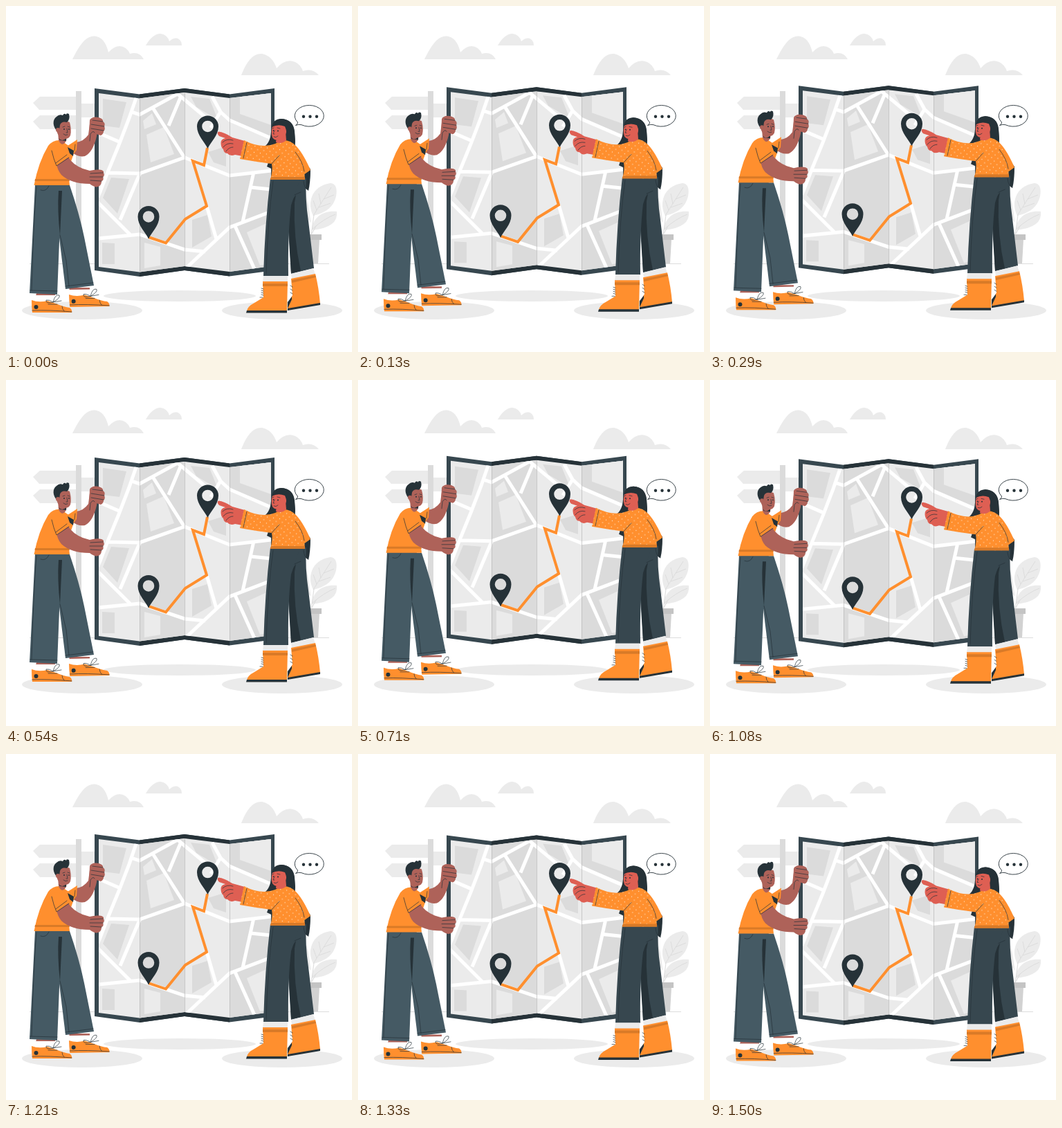
An HTML page for the animation above (1540 ms loop, 500x500 px).

```html
<!DOCTYPE html>
<html lang="en">
<head>
<meta charset="utf-8">
<title>Reading the map</title>
<style>
  html, body { margin: 0; width: 100%; height: 100%; overflow: hidden; background: #fff; }
  svg { display: block; width: 100%; height: 100%; }
  .pale { fill: #ebebeb; }
  .grey { fill: #dbdbdb; }
  .ink { fill: #263238; }
  .slate { fill: #37474f; }
  .denim { fill: #455a64; }
  .orange { fill: #ff8f2e; }
  .rust { fill: #d97a27; }
  .brown { fill: #ae6259; }
  .red { fill: #de5f53; }
  .white { fill: #fff; }
  .line { fill: none; stroke: #263238; stroke-width: .7; stroke-linecap: round; stroke-linejoin: round; }
  .road { fill: none; stroke: #fff; stroke-width: 5; }
  .route { fill: none; stroke: #ff8f2e; stroke-width: 4; }
  .vein { fill: none; stroke: #d6d6d6; stroke-width: .7; }
</style>
</head>
<body>
<svg viewBox="0 0 500 500">
  <defs>
    <clipPath id="sheet"><path d="M134 126L193 133.500 258 125 323 133 383 126V376L323 384 258 376 193 384.500 134 377Z"/></clipPath>
    <pattern id="dots" width="9" height="9" patternUnits="userSpaceOnUse" patternTransform="rotate(8)">
      <g fill="#ffe3c8"><circle cx="2" cy="2" r=".65"/><circle cx="6.500" cy="6.500" r=".65"/></g>
    </pattern>
    <path id="jumper" d="M344 194Q369 207 389 199L398 194Q412 193 419 203Q430 220 432 251H382Q386 237 384 228Q360 225 338 221Z"/>
    <path id="pin" class="ink" fill-rule="evenodd" d="M0 0C-4-9-15.500-19-15.500-32A15.500 15.500 0 0 1 15.500-32C15.500-19 4-9 0 0ZM-8.300-32A8.300 8.300 0 0 0 8.300-32A8.300 8.300 0 0 0-8.300-32Z"/>
    <g id="sneaker">
      <path class="white" d="M1-7H35L34 5H2Z"/>
      <path class="orange" d="M0 0Q10 4 23 1L35 5Q47 10 55 11Q59 14 58 18H1Q0 10 0 0Z"/>
      <path class="line" d="M1 15Q25 14 58 17M44 9Q44 13 47 16M24 6L37 6M31 3Q20 6 21 0Q25-1 31 3Q34-9 40-7Q42-3 31 3L43 1"/>
      <circle class="ink" cx="6.500" cy="10" r="3"/>
    </g>
  </defs>

  <g class="pale">
    <path d="M96 77C106 57 115 43 128 43.500Q143 45 148 67Q161 53 173 61Q177 64 179 69Q193 65 199 77Z"/>
    <path d="M202 57Q212 40 223 40Q233 41 236 51Q244 44 250 48Q254 51 254 57Z"/>
    <path d="M340 100C348 80 357 68 370 69Q385 72 391 90Q404 75 418 81Q426 85 429 94Q443 89 452 100Z"/>
    <path d="M39 140L49 131H109V150H48ZM39 167L49 158H109V178H49ZM109 141H135V161H109Z"/>
    <ellipse cx="110" cy="440" rx="87" ry="13"/>
    <ellipse cx="251" cy="419" rx="110" ry="8"/>
    <ellipse cx="399" cy="440" rx="87" ry="13"/>
  </g>
  <path class="grey" d="M101 123H109V372H101Z"/>
  <path d="M34 372.500H467" stroke="#d5d5d5" stroke-width=".8"/>
  <g class="pale">
    <path d="M444 303C435 287 440 260 469 256Q480 257 477 275Q472 297 444 303Z"/>
    <path d="M442 324C443 304 460 295 478 297Q481 320 442 324Z"/>
    <path d="M441 313C437 292 438 274 425 261Q415 288 441 313Z"/>
  </g>
  <path class="vein" d="M444 303Q457 282 470 262M449 295L444 281M455 286L452 271M452 291L469 285M459 279L474 273M443 322Q460 307 476 301"/>
  <path d="M441 332L445 302M442 329L448 318" fill="none" stroke="#dbdbdb"/>
  <path fill="#d2d2d2" d="M435 337H453L451 372H437Z"/>
  <path fill="#c4c4c4" d="M432 330H456V338H432Z"/>

  <path class="white" stroke="#263238" stroke-width=".9" d="M418.500 172.500Q422 170.500 421.500 168A21 15.300 0 1 1 427 171.700Q423 170.500 418.500 172.500Z"/>
  <g class="ink"><circle cx="430" cy="159.700" r="2.200"/><circle cx="439.500" cy="159.700" r="2.200"/><circle cx="449" cy="159.700" r="2.200"/></g>

  <g id="float">
    <path class="slate" d="M128 119L193 127.500 258 119 323 127.500 388 119V382L323 390.500 258 382 193 391 128 382Z"/>
    <path class="ink" d="M193 127.500L258 119 323 127.500V390.500L258 382 193 391Z"/>
    <g clip-path="url(#sheet)">
      <path class="pale" d="M128 119H388V392H128Z"/>
      <g class="grey">
        <path d="M193 119H258V392H193ZM323 119H388V392H323Z"/>
        <path d="M140 134L174 139 164 176 140 173ZM152 248L178 250 161 300 140 277ZM139 342L157 343V373H139Z"/>
        <path d="M267 131L294 134 306 164 275 146ZM292 211L318 203V232L300 226ZM269 309L291 302 297 333 269 349Z"/>
      </g>
      <g class="pale">
        <path d="M203 186L228 175 243 214 209 226ZM198 166L211 155 217 171 200 178ZM200 342L223 348V375L200 379Z"/>
        <path d="M338 130L383 124V172L338 156ZM323 165L383 191V238L323 245ZM348 327L383 311V372L367 375Z"/>
      </g>
      <path class="road" d="M189 130L178 162 163 201 147 240 133 276M133 183L163 196M181 153L193 157 248 127 291 163M147 241L193 242 258 219 323 245 383 238M133 284L180 331M193 243L165 309M133 336L193 330 258 352 288 355M212 147L259 221M253 130L235 173M298 131L310 153 323 165 383 191M310 153L296 176M358 240L342 312M354 262L383 265M260 379L323 320 383 297M290 289L304 337M331 318L359 380"/>
      <path d="M193.500 128V390M258.500 120V382M323.500 128V390" fill="none" stroke="#b8b8b8" stroke-width=".7"/>
    </g>
    <path class="route" d="M291 205L286 230 270 224 290 289 259 308 231 342.500 206 334"/>
    <use href="#pin" x="206" y="336.500"/>
    <use href="#pin" x="291.500" y="206"/>

    <!-- man -->
    <path class="brown" d="M44 415H71V419H43ZM91 407H121V411H92Z"/>
    <use href="#sneaker" transform="translate(91 417) rotate(-1)"/>
    <use href="#sneaker" transform="translate(37 425)"/>
    <path class="denim" d="M75 259H92Q106 300 113 334L127 404 86 409 77 335Z"/>
    <path class="denim" d="M42 258H85Q77 295 77 340L74 417 34 415 38 338Z"/>
    <path class="ink" d="M76 267H81L78 331Q74 295 76 267Z"/>
    <path class="line" d="M50 266Q58 269 62 260M44 261Q41 300 39 350L37 411M35 411L74 412M78 331L87 368 91 405M86 405L126 400"/>
    <path class="brown" d="M101 197Q112 196 119 186L122 163 133 162 131 188Q126 211 114 217Q104 219 95 211Z"/>
    <path class="orange" d="M89 202Q97 197 103 193L102 208 97 215Z"/>
    <path class="orange" d="M40.500 259Q47 225 61 202Q68 193 79 194L92 203 97 216Q88 237 92 259Z"/>
    <path class="ink" d="M89 204L98 209 97 217 92 213Z"/>
    <path class="rust" d="M42 250H91L92 253H41.500Z"/>
    <path class="brown" d="M75 182L88 188 87 195Q81 205 76 194Z"/>
    <path class="ink" d="M76 191Q81 197 87 191L87 195 78 194Z"/>
    <path class="brown" d="M72 170Q82 162 92 168Q95 179 93 187Q90 194 81 191Q72 187 72 170Z"/>
    <path class="ink" d="M74 181C67 174 67 164 73 160Q77 156 82 158Q84 154 87 157Q87 154 91 156Q93 164 88 168Q80 166 78 172L77 179Z"/>
    <circle class="brown" cx="75" cy="179" r="3"/>
    <path class="line" d="M82 175L85 174M89 174L92 175M88 177L89 183 87 183M83 185Q86 188 89 186"/>
    <g class="ink"><circle cx="84" cy="178" r="1"/><circle cx="91" cy="178" r=".9"/></g>
    <path class="brown" d="M73 227L89 217Q96 229 111 235L121 238Q128 236 135 236.500Q142 237 141 241Q143 245 140 247Q142 252 138 253Q138 258 135 260Q130 264 121 257Q94 257 80 244Q74 237 73 227Z"/>
    <path class="orange" d="M65 206Q76 200 82 207L91 218 73 231Z"/>
    <path class="line" d="M66 209Q69 222 73 231L91 219M72 227L88 215M122 242L140 241M121 247L140 247M122 252L138 253M100 200L99 209"/>
    <path class="brown" d="M121 165Q124 159 134 161Q141 163 140 167Q144 169 142 174Q144 178 141 181Q141 185 137 187L127 184Q127 194 122 199Q118 196 120 187Z"/>
    <path class="line" d="M125 165L140 167M123 171L142 174M123 177L141 180M128 183Q126 179 122 185L121 195"/>

    <!-- woman -->
    <path class="ink" d="M383 182Q387 164 398 163Q415 164 417 181Q420 210 414 238Q391 240 377 232Q383 220 369 206Q382 200 383 182Z"/>
    <path class="ink" d="M420 208L440 236Q440 255 437 267L429 260Z"/>
    <path class="orange" d="M412 197Q425 203 440 237L430 244Z"/>
    <path class="slate" d="M382 249H434Q432 278 437 311L445 379 412 387 407 310Z"/>
    <path class="ink" d="M419 273Q410 283 408 306L412 386 426 383Q415 334 417 284Z"/>
    <path class="slate" d="M382 249H425Q417 273 412 288Q407 330 408 390H372Q374 316 382 249Z"/>
    <path class="line" d="M430 253Q431 263 435 265M386 253Q378 310 376 387M417 273Q421 271 426 269"/>
    <path class="pale" d="M372 390H407V399H371ZM412 387L444 379 447 388 413 395Z"/>
    <path class="orange" d="M412 394L447 387Q452 407 454 430L407 438V430L414 418Z"/>
    <path class="ink" d="M407 437L454 429V432L407 440ZM407 428L413 420V424L407 437Z"/>
    <path class="rust" d="M413 396L447 389 448 392 413 400Z"/>
    <path class="orange" d="M371 398H407L406 441H348Q349 434 359 429L372 421Z"/>
    <path class="ink" d="M348 440H406V443.500H347Z"/>
    <path class="rust" d="M371 401H407V405H371Z"/>
    <path class="line" d="M372 409L369 408M372 412L369 411M372 415L369 414M372 418L369 417M371 421L367 421M414 406L411 404M414 411L411 409M414 416L411 414"/>

    <path class="red" d="M345 195L327 190Q315 182 307 181.500Q304 184 308 188L317 191Q310 192 310.500 199Q311 205 314 207Q315 213 320 213Q324 218 331 215L342 217Z"/>
    <path class="line" d="M313 197Q319 191 328 194M314 204Q319 197 328 199M318 210Q322 204 328 204"/>
    <use href="#jumper" class="orange"/>
    <use href="#jumper" fill="url(#dots)"/>
    <path class="rust" d="M383 247H432V251H382Z"/>
    <path class="line" d="M348 197L343 220M384 228Q390 221 395 216M418 211Q429 225 431 239"/>
    <path class="red" d="M391 188L404 181 405 194Q399 200 390 197Z"/>
    <path class="red" d="M386 172Q396 168 405 175Q407 188 397 192Q389 196 385 190Q382 181 386 172Z"/>
    <path class="ink" d="M384 175Q386 163 398 163Q415 164 417 183L418 198Q410 194 405 190Q407 183 403 174Q393 170 384 175Z"/>
    <path class="line" d="M385 177L387 176M392 176L396 177M388 180L386 185 388 185M387 189Q390 191 393 188"/>
    <g class="ink"><circle cx="386.500" cy="180" r=".9"/><circle cx="393" cy="180.500" r="1"/></g>
  </g>
</svg>
<script>
  const LOOP = 1540, LEAD = 50, RISE = 10;
  const float = document.getElementById("float");

  // Linear bob: up for half the loop, then back down.
  const lift = t => RISE * (1 - Math.abs(1 - 2 * ((t + LEAD) % LOOP) / LOOP));
  const rest = lift(0);

  function draw() {
    const t = performance.now() % LOOP;
    float.setAttribute("transform", `translate(0 ${(rest - lift(t)).toFixed(3)})`);
    requestAnimationFrame(draw);
  }
  draw();
</script>
</body>
</html>
```
